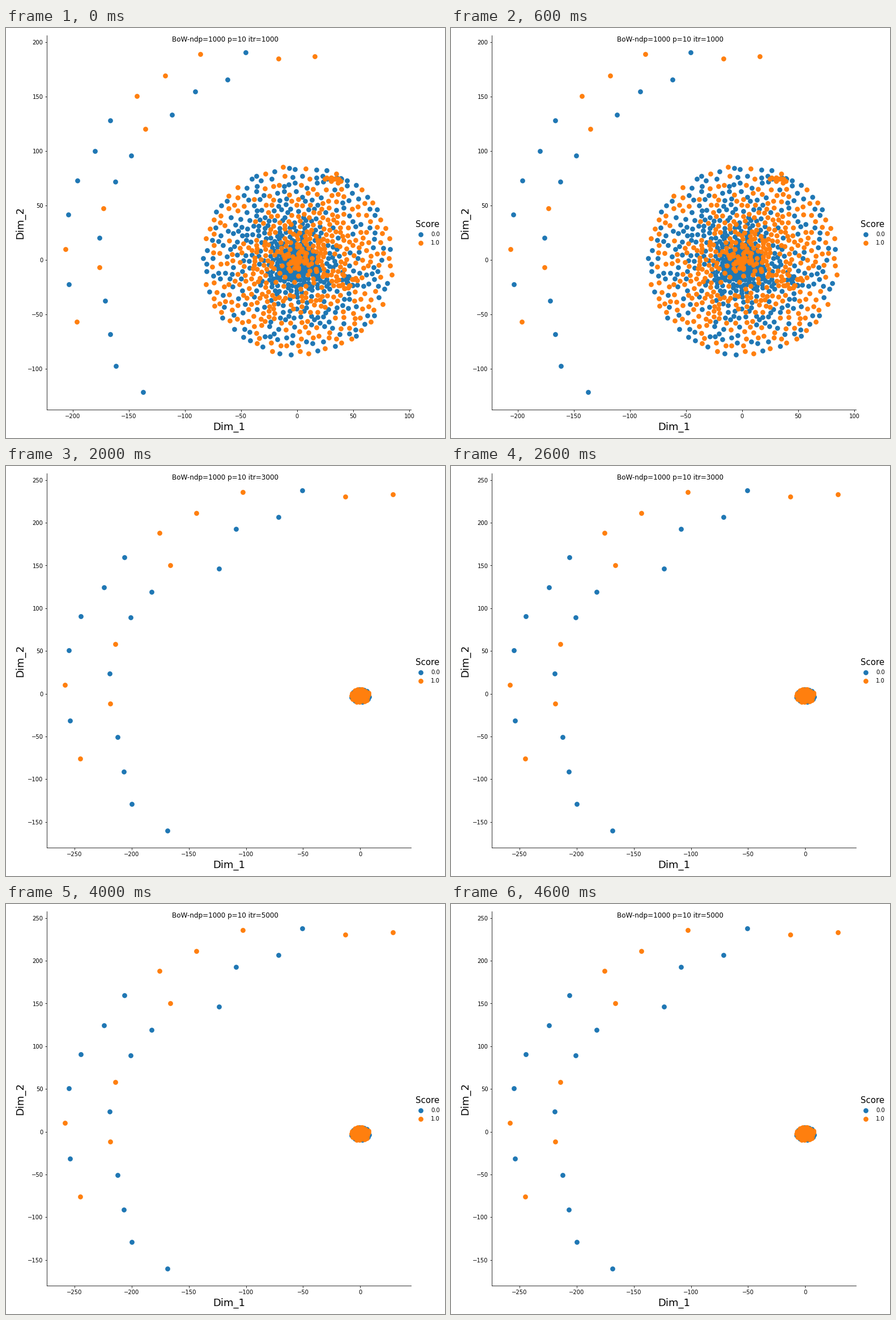
These frames come from a looping animation (775 by 723 pixels, 5000 ms). A matplotlib script:

```python
import numpy as np
import matplotlib.pyplot as plt
from matplotlib.animation import FuncAnimation

W, H, DPI = 775, 723, 72
BLUE, ORANGE = "#1f77b4", "#ff7f0e"
LEFT, RIGHT, TOP, BOTTOM = 72.4, 715, 13.5, 673.4
rng = np.random.default_rng(7)

# Two chains of stray points, bottom to top, in stage pixels (y downwards).
outer = [(131, 516), (113, 449), (104, 386), (111, 325), (132, 265), (173, 214),
         (209, 161), (271, 118), (336, 83), (418, 46), (523, 43), (599, 54), (683, 50)]
inner = [(285, 643), (222, 596), (208, 539), (197, 478), (184, 419), (183, 366),
         (193, 314), (220, 267), (257, 222), (290, 175), (406, 111), (481, 90)]
chain = np.array(outer + inner, float)
chain_warm = np.array([c == "O" for c in "OBOBBBBOOOBOO" + "BBBBOBOBBOBB"])
drifter = [(293, 153), (366, 170), (376, 181)]


def squeeze(p):
    """The chains before they spread out sideways."""
    x, y = p.T
    return np.column_stack([104.5 + 0.76 * (x - 104),
                            y + 4 * np.sin(np.pi * (y - 50) / 550)])


def spread(n, cx, cy, radius):
    """Evenly spaced points whose spacing grows with the distance from the middle."""
    placed = [(cx, cy)]
    for _ in range(n - 1):
        r = radius * rng.random(40) ** 1.2
        a = rng.random(40) * 2 * np.pi
        cand = np.column_stack([cx + r * np.cos(a), cy + r * np.sin(a)])
        gap = np.linalg.norm(cand[:, None] - np.array(placed), axis=2).min(axis=1)
        placed.append(cand[np.argmax(gap / (r + 6) ** 0.58)])
    return np.array(placed)


def bump(p, x, y, size):
    return np.exp(-((p[:, 0] - x) ** 2 + (p[:, 1] - y) ** 2) / (2 * size ** 2))


def ball():
    p = np.vstack([spread(930, 515.5, 410, 168),
                   rng.normal((577, 266), (9, 3), (14, 2)),
                   rng.normal((600, 445), (8, 7), (16, 2))])
    chance = (0.53 + 0.3 * bump(p, 570, 380, 40) + 0.4 * bump(p, 577, 266, 12)
              - 0.35 * bump(p, 440, 335, 32) - 0.4 * bump(p, 522, 432, 32)
              - 0.2 * bump(p, 518, 375, 18))
    return p, rng.random(len(p)) < chance


def blob(n, rx, ry):
    """A packed ellipse of n points, alternating between the two groups."""
    k = np.arange(n) + 0.5
    r, a = np.sqrt(k / n), k * np.pi * (3 - 5 ** 0.5)
    p = np.column_stack([625.5 + rx * r * np.cos(a), 405 + ry * r * np.sin(a)])
    return p, rng.random(n) < 0.65


def stage(strays, lone, cluster):
    """Blue and orange points of one picture."""
    p = np.vstack([strays, [lone], cluster[0]])
    warm = np.concatenate([chain_warm, [False], cluster[1]])
    return p[~warm], p[warm]


early = stage(squeeze(chain), drifter[0], ball())
middle = stage(chain, drifter[1], blob(260, 30, 22))
late = stage(chain, drifter[2], blob(130, 16, 12))

# Each view: points, x zero and scale, y zero and scale, tick ranges.
view_early = (early, 513.8, 1.981, 409.2, 1.92, (-200, 101), (-100, 201))
view_middle = (middle, 625.7, 2.03, 401.7, 1.518, (-250, 1), (-150, 251))
view_late = (late, 625.3, 2.018, 401.7, 1.508, (-250, 1), (-150, 251))
views = [view_early, view_middle, view_late, view_late, view_late]

fig = plt.figure(figsize=(W / DPI, H / DPI), dpi=DPI, facecolor="white")
ax = fig.add_axes([LEFT / W, 1 - BOTTOM / H, (RIGHT - LEFT) / W, (BOTTOM - TOP) / H])
ax.set_xlim(LEFT, RIGHT)
ax.set_ylim(BOTTOM, TOP)
ax.spines[["top", "right"]].set_visible(False)
ax.set_xlabel("Dim_1", fontsize=18)
ax.set_ylabel("Dim_2", fontsize=18)
dots = [ax.scatter([], [], s=77, color=color, linewidths=0, label=name)
        for color, name in ((BLUE, "0.0"), (ORANGE, "1.0"))]
fig.legend(handles=dots, title="Score", title_fontsize=15, fontsize=10,
           loc="center right", frameon=False, scatterpoints=1)
title = fig.suptitle("", x=0.4993, fontsize=12)


def ticks(zero, scale, span):
    values = np.arange(*span, 50)
    return zero + scale * values, [str(v).replace("-", "\u2212") for v in values]


def draw(i):
    groups, x0, sx, y0, sy, x_span, y_span = views[i]
    for dot, group in zip(dots, groups):
        dot.set_offsets(group)
    ax.set_xticks(*ticks(x0, sx, x_span))
    ax.set_yticks(*ticks(y0, -sy, y_span))
    title.set_text(f"BoW-ndp=1000 p=10 itr={(i + 1) * 1000}")
    return dots


anim = FuncAnimation(fig, draw, frames=len(views), interval=1000, repeat=True,
                     repeat_delay=0, blit=False)
plt.show()
```
